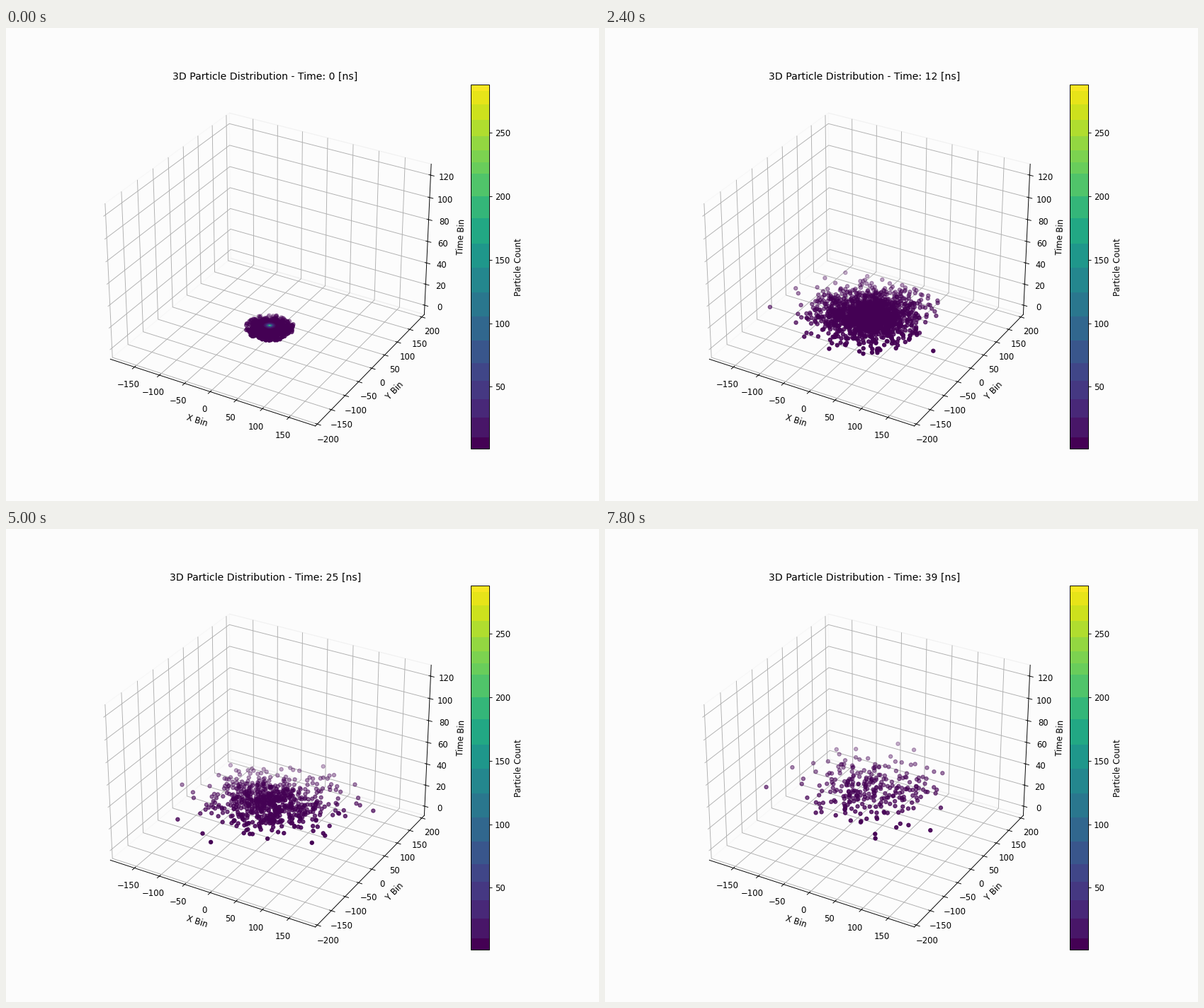
These frames come from a looping animation (837 by 669 pixels, 8000 ms). A matplotlib script:

```python
import numpy as np
import matplotlib.pyplot as plt
from matplotlib.animation import FuncAnimation
from matplotlib.cm import ScalarMappable
from matplotlib.colors import ListedColormap, Normalize

W, H, DPI = 837, 669, 83.7
STEPS, INTERVAL = 40, 200
PAPER = "#fcfcfc"
PEAK = 288

# Viridis reduced to flat bands; sizes run from the bottom of the bar upwards.
BANDS = [16, 28, 26, 26, 25, 32, 34, 34, 35, 34,
         36, 31, 32, 16, 17, 20, 23, 22, 19, 9]


def banded_viridis():
    sizes = np.array(BANDS)
    mids = (np.cumsum(sizes) - sizes / 2) / sizes.sum()
    mids[0] = 0
    return ListedColormap(np.repeat(plt.get_cmap("viridis")(mids), sizes, axis=0))


def particles(t):
    """Occupied x/y bins and their counts at time bin t."""
    rng = np.random.default_rng(700 + t)
    total = int(2100 * np.exp(-0.066 * (t - 8)) * (1 - 0.65 * np.exp(-t / 2)))
    spread = 72 * (1 - 0.7 * np.exp(-t / 10))
    reach = min(43 + 15 * t, 185)
    power = 0.55

    # Truncated exponential draw bent into a radial profile
    cut = 1 - np.exp(-(reach / spread) ** (1 / power))
    r = spread * (-np.log(1 - cut * rng.random(2 * total))) ** power
    angle = rng.uniform(0, 2 * np.pi, r.size)
    hits = np.rint(np.column_stack([r * np.cos(angle), r * np.sin(angle)]))
    if t == 0:
        core = np.mgrid[-12:13, -12:13].reshape(2, -1).T
        hits = np.vstack([core, hits])

    bins = np.unique(hits, axis=0)
    dist = np.hypot(*bins.T)
    rank = rng.random(len(bins))
    if t == 0:
        rank[dist < 12] = 0
    keep = np.argsort(rank)[:total]
    count = 1 + (PEAK - 1) * np.exp(-dist / 3 - t / 0.7)
    return bins[keep, 0], bins[keep, 1], count[keep]


fig = plt.figure(figsize=((W + 0.001) / DPI, (H + 0.001) / DPI), dpi=DPI,
                 facecolor=PAPER)
ax = fig.add_subplot(projection="3d", facecolor=PAPER)
cmap = banded_viridis()
norm = Normalize(1, PEAK)

ax.set_xlim(-199, 199)
ax.set_ylim(-206.5, 210.5)
ax.set_zlim(-8.82, 129.82)
ax.set_xlabel("X Bin")
ax.set_ylabel("Y Bin")
ax.set_zlabel("Time Bin")
for axis in (ax.xaxis, ax.yaxis, ax.zaxis):
    axis.pane.fill = False

bar = fig.colorbar(ScalarMappable(norm, cmap), ax=ax)
bar.set_label("Particle Count")

cloud = None


def draw(t):
    global cloud
    if cloud is not None:
        cloud.remove()
    x, y, count = particles(t)
    cloud = ax.scatter(x, y, np.full(x.size, t), c=count, cmap=cmap,
                       norm=norm, s=20)
    ax.set_title(f"3D Particle Distribution - Time: {t} [ns]")
    return cloud,


anim = FuncAnimation(fig, draw, frames=STEPS, interval=INTERVAL,
                     repeat=True, repeat_delay=0, blit=False)
plt.show()
```
